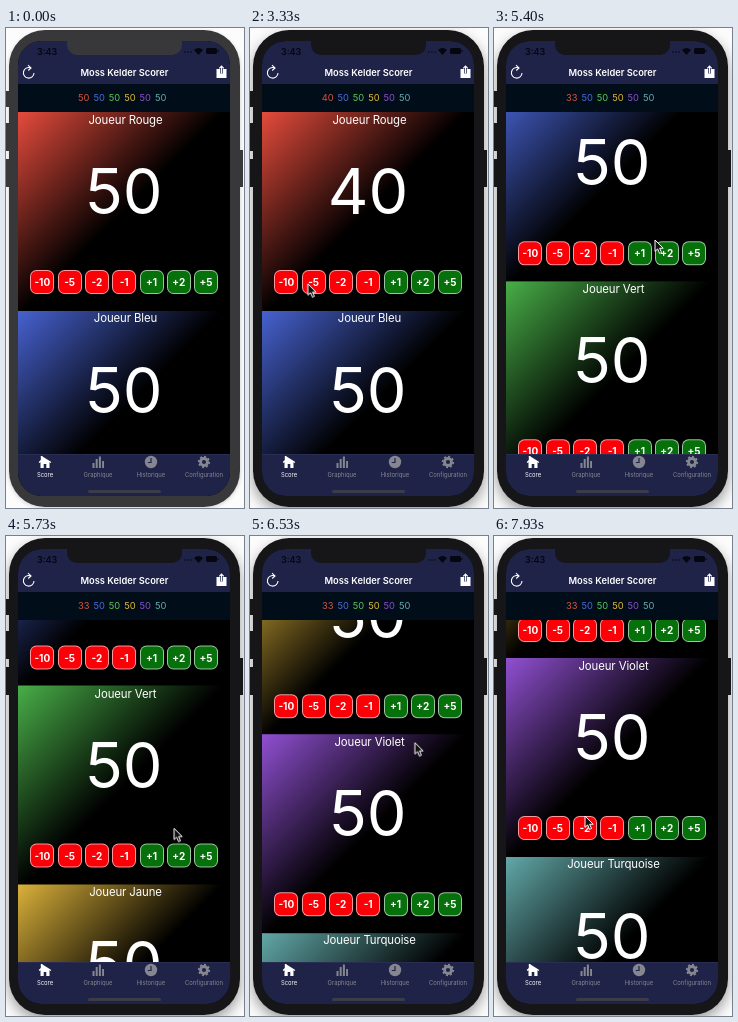
An HTML page that plays this animation: 238x480 px, repeating every 8000 ms.

```html
<!DOCTYPE html>
<html lang="fr">
<head>
<meta charset="utf-8">
<title>Score</title>
<style>
  html, body { margin: 0; width: 100%; height: 100%; overflow: hidden; background: #fcfcfc; }
  #stage { position: relative; width: 238px; height: 480px; overflow: hidden; color: #fff; font-family: Inter, "Liberation Sans", sans-serif; }
  #stage div, #stage svg { position: absolute; }
  .case, .key { background: #38383a; animation: focus 8s step-end infinite; }
  .case { left: 3px; top: 1.5px; width: 231px; height: 477px; border-radius: 36px; }
  .shade { left: 3px; top: 2px; width: 231px; height: 476px; border-radius: 36px; animation: shade 8s step-end infinite; }
  .key { width: 4px; }
  .screen { left: 12px; top: 13px; width: 212px; height: 455px; border-radius: 24px; overflow: hidden; background: #000; }
  .nav { left: 0; top: 0; width: 212px; height: 43px; background: #1f2348; }
  .notch { left: 49px; top: -8px; width: 115px; height: 22px; border-radius: 10px; }
  .clock { left: 19px; top: 4.5px; color: #05060f; font: 600 9px/11px Inter, sans-serif; }
  .title { left: .5px; width: 212px; top: 25px; text-align: center; font: 600 9.3px/13px Inter, sans-serif; }
  .totals { left: 0; top: 43px; width: 212px; height: 28px; background: #020d1a; }
  .totals div { top: 9px; width: 16px; text-align: center; font-size: 9.3px; line-height: 10px; }
  .list { left: 0; top: 71px; width: 212px; height: 342px; overflow: hidden; }
  .players { left: 0; top: 0; width: 212px; animation: scroll 8s infinite linear; }
  .player { width: 212px; height: 198.5px; background: linear-gradient(135deg, var(--tint), #000 50%); }
  .name { left: 1.5px; width: 100%; top: .8px; text-align: center; font-size: 11.4px; line-height: 15px; letter-spacing: -.1px; }
  .score { width: 100%; top: 48px; text-align: center; font-size: 63px; line-height: 63px; font-weight: 400; }
  .roll { display: block; height: 1em; line-height: 1em; overflow: hidden; }
  .roll span { display: block; animation: roll 8s step-end infinite; }
  .roll b { display: block; font-weight: inherit; }
  .step { top: 158px; width: 24px; height: 24px; box-sizing: border-box; border: 1px solid #fff9; border-radius: 6.5px;
    background-clip: border-box; text-align: center; font-size: 10px; line-height: 22px; font-weight: 700; }
  .tabs { left: 0; top: 413px; width: 212px; height: 42px; background: #1f2348; box-shadow: inset 0 .5px #34385e; }
  .tab { top: 0; width: 60px; height: 30px; color: #85868f; text-align: center; font-size: 5.9px; }
  .tab:first-child { color: #fff; }
  .tab svg { left: 23px; top: 1px; width: 14px; height: 14px; }
  .tab div { width: 100%; top: 17px; line-height: 8px; }
  .home { left: 70px; top: 449px; width: 73px; height: 2.5px; border-radius: 2px; background: #3b3c48; }
  .cursor { left: 0; top: .7px; width: 10px; height: 14.5px; overflow: visible; animation: point 8s infinite ease-in-out; }

  @keyframes focus { 0% { background: #38383a; } 35.5%, 100% { background: #161618; } }
  @keyframes shade { 0% { box-shadow: 0 2px 4px #0003; } 35.5%, 100% { box-shadow: 0 6px 14px #0006; } }
  @keyframes roll {
    0% { transform: none; }
    38% { transform: translateY(-25%); }
    45% { transform: translateY(-50%); }
    52%, 100% { transform: translateY(-75%); }
  }
  @keyframes scroll {
    0%, 61.9% { transform: translateY(0); animation-timing-function: ease-in; }
    66.2% { transform: translateY(-167px); animation-timing-function: ease-out; }
    71.6%, 73.1% { transform: translateY(-331.5px); }
    77.6% { transform: translateY(-515.5px); animation-timing-function: cubic-bezier(.2, .4, .4, 1); }
    86.2%, 87.6% { transform: translateY(-724.5px); animation-timing-function: ease-in-out; }
    98%, 100% { transform: translateY(-756px); }
  }
  @keyframes point {
    0%, 15.6% { transform: translate(-14px, 130px); }
    21.5%, 23.4% { transform: translate(79.5px, 70px); }
    29.5% { transform: translate(154px, 71px); }
    35.5%, 38.5% { transform: translate(36px, 254px); }
    43%, 46% { transform: translate(63px, 255px); }
    50%, 53% { transform: translate(91px, 255px); }
    60.5%, 61.9% { transform: translate(150px, 367px); animation-timing-function: ease-in; }
    66.2% { transform: translate(160px, 200px); }
    71.6% { transform: translate(168px, 290px); animation-timing-function: linear; }
    73.1% { transform: translate(170px, 342px); animation-timing-function: linear; }
    77.6% { transform: translate(174.5px, 158px); }
    87.6% { transform: translate(146px, 299px); }
    98%, 100% { transform: translate(91px, 279px); }
  }
</style>
</head>
<body>
<div id="stage">
  <div class="shade"></div>
  <div class="key" style="left:0;top:63px;height:16px"></div>
  <div class="key" style="left:0;top:95px;height:28px"></div>
  <div class="key" style="left:0;top:131px;height:28px"></div>
  <div class="key" style="left:233px;top:122px;height:37px"></div>
  <div class="case"></div>
  <div class="screen">
    <div class="list"><div class="players"></div></div>
    <div class="nav">
      <div class="clock">3:43</div>
      <svg style="left:165px;top:5px" width="38" height="10" fill="#05060f">
        <circle cx="2" cy="6" r=".8"/><circle cx="5" cy="6" r=".8"/><circle cx="8" cy="6" r=".8"/>
        <path d="M11 4Q15.500 0 20 4L15.500 9Z"/>
        <rect x="23" y="2" width="11" height="6" rx="1.500"/><rect x="34.600" y="4" width="1" height="2"/>
      </svg>
      <svg style="left:3px;top:23px" width="16" height="17" fill="none" stroke="#fff" stroke-width="1.100">
        <path d="M9.500 3.800A5.300 5.300 0 1 0 13 9M7 1.200 10 3.900 7.200 6.500"/>
      </svg>
      <div class="title">Moss Kelder Scorer</div>
      <svg style="left:197px;top:23px" width="13" height="16">
        <path fill="#fff" d="M1.500 5H11.500V14H1.500Z"/>
        <path fill="none" stroke="#1f2348" stroke-width="2.600" d="M6.500 9.500V4"/>
        <path fill="none" stroke="#fff" stroke-width="1.200" d="M6.500 9.500V2M4.200 4.300 6.500 2 8.800 4.300"/>
      </svg>
    </div>
    <div class="totals"></div>
    <div class="tabs">
      <div class="tab" style="left:-3px">
        <svg viewBox="0 0 14 14" fill="currentColor"><path d="M7 1 .700 7 1.500 8 2.500 7.300V13H5.700V9H8.300V13H11.500V7.300L12.500 8 13.300 7 4.500 1.500V1H2.800V5Z"/></svg>
        <div>Score</div>
      </div>
      <div class="tab" style="left:50px">
        <svg viewBox="0 0 14 14" fill="currentColor"><path d="M1.500 8H3.500V13H1.500ZM4.700 4H6.700V13H4.700ZM7.900 1.500H9.900V13H7.900ZM11.100 6H13V13H11.100Z"/></svg>
        <div>Graphique</div>
      </div>
      <div class="tab" style="left:103px">
        <svg viewBox="0 0 14 14"><circle cx="7" cy="7" r="6.200" fill="currentColor"/><path d="M7 3V7.500H3.800" fill="none" stroke="#1f2348" stroke-width="1.200"/></svg>
        <div>Historique</div>
      </div>
      <div class="tab" style="left:156px">
        <svg viewBox="0 0 14 14" fill="none" stroke="currentColor">
          <circle cx="7" cy="7" r="3.500" stroke-width="2.800"/>
          <circle cx="7" cy="7" r="5.200" stroke-width="1.900" pathLength="16" stroke-dasharray="1 1"/>
        </svg>
        <div>Configuration</div>
      </div>
    </div>
    <div class="home"></div>
    <div class="key notch" style="width:115px"></div>
  </div>
  <svg class="cursor" viewBox="0 0 11 16">
    <path d="M0 0V12.500L2.900 9.900 5 14.800 7.200 13.800 5.100 9.100H9Z" fill="#111" stroke="#fff" stroke-width="1.100" stroke-linejoin="round"/>
  </svg>
</div>
<script>
  const players = [
    ["Rouge", "#e54b3c", "#d8523f"],
    ["Bleu", "#4762d0", "#4a6cdc"],
    ["Vert", "#48ae48", "#58cc55"],
    ["Jaune", "#dab13a", "#e0b83c"],
    ["Violet", "#9050d2", "#8a50cc"],
    ["Turquoise", "#62a8a8", "#62aeb0"]
  ];
  const steps = ["-10", "-5", "-2", "-1", "+1", "+2", "+5"];
  const rolling = `<span class="roll"><span>${[50, 40, 35, 33].map(n => `<b>${n}</b>`).join("")}</span></span>`;
  const scoreOf = i => i ? "50" : rolling;

  const buttons = steps.map((label, i) =>
    `<div class="step" style="left:${12.3 + i * 27.3}px;background-color:${label[0] === "-" ? "#fb0007" : "#06700b"}">${label}</div>`
  ).join("");

  document.querySelector(".players").innerHTML = players.map(([name, tint], i) =>
    `<div class="player" style="top:${i * 198.5}px;--tint:${tint}">
      <div class="name">Joueur ${name}</div><div class="score">${scoreOf(i)}</div>${buttons}
    </div>`
  ).join("");

  document.querySelector(".totals").innerHTML = players.map(([, , color], i) =>
    `<div style="left:${57.7 + i * 15.4}px;color:${color}">${scoreOf(i)}</div>`
  ).join("");
</script>
</body>
</html>
```
